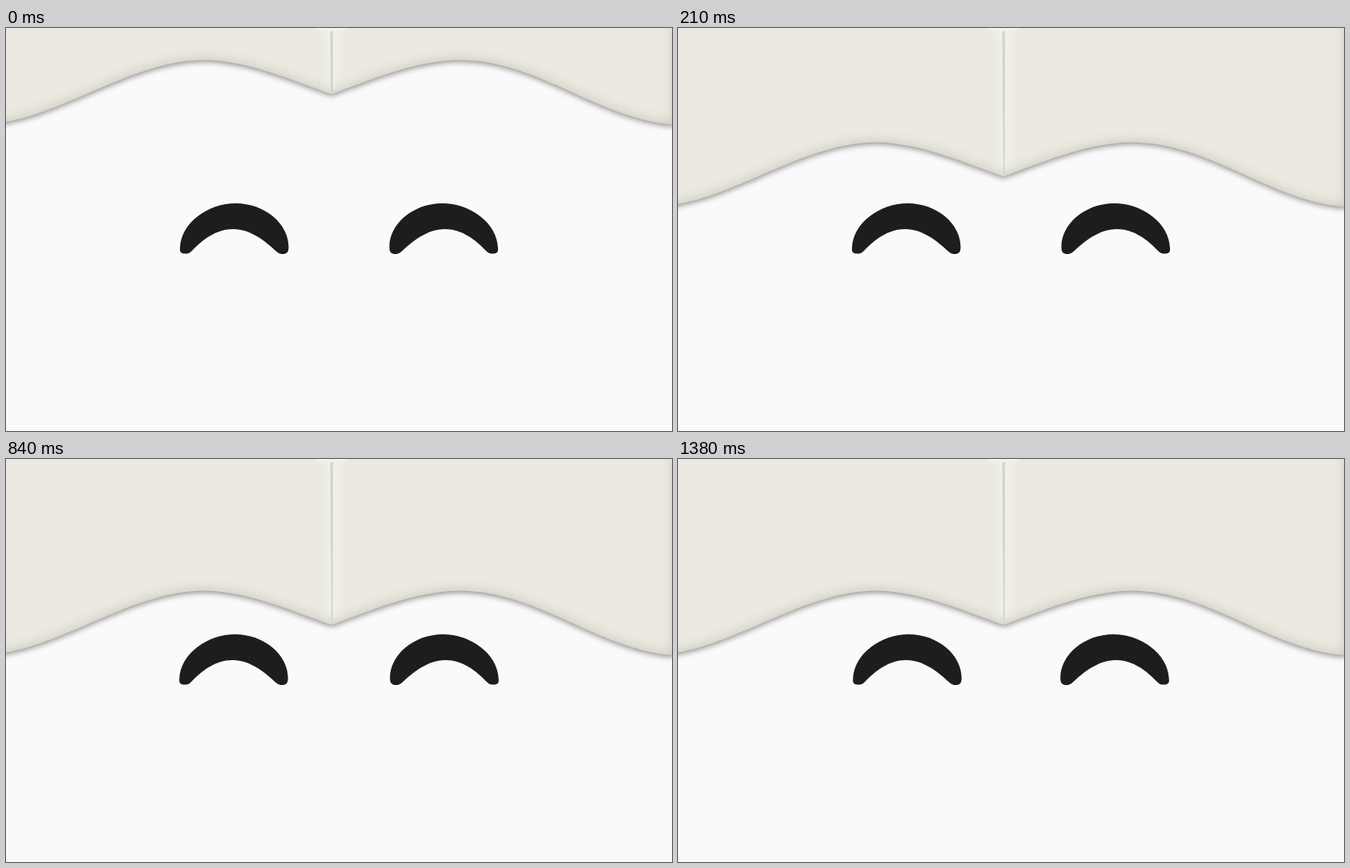
An HTML page with a canvas for the animation above (1410 ms loop, 800 px wide and 485 px high).

```html
<!DOCTYPE html>
<html lang="en">
<head>
<meta charset="utf-8">
<title>Smiling eyes</title>
<style>
  html, body { margin: 0; width: 100%; height: 100%; overflow: hidden; background: #fafafa; }
  canvas { display: block; width: 800px; height: 485px; }
</style>
</head>
<body>
<canvas id="stage" width="800" height="485"></canvas>
<script>
const ctx = document.getElementById('stage').getContext('2d');
const LOOP = 1410, STEP = 30;

// CSS-style cubic bezier easing
function bezier(x1, y1, x2, y2) {
  const at = (a, b, s) => 3 * (1 - s) ** 2 * s * a + 3 * (1 - s) * s * s * b + s ** 3;
  return x => {
    let lo = 0, hi = 1;
    for (let i = 0; i < 24; i++) {
      const mid = (lo + hi) / 2;
      if (at(x1, x2, mid) < x) lo = mid; else hi = mid;
    }
    return at(y1, y2, (lo + hi) / 2);
  };
}

const ease = bezier(0.25, 0.1, 0.25, 1);
const inOut = bezier(0.42, 0, 0.58, 1);
const quick = bezier(0.25, 0.1, 0.1, 1);

// each row: start, end, from, to, easing
const DROP = [[3, 398, 0, 120, ease]];
const SHIFT = [
  [240, 560, 0, 4.8, inOut],
  [560, 1200, 4.8, -2.1, quick],
  [1200, 1840, -2.1, 4.8, ease]
];

function track(rows, t) {
  let value = rows[0][2];
  for (const [start, end, from, to, fn] of rows) {
    if (t < start) break;
    value = from + (to - from) * fn(Math.min(1, (t - start) / (end - start)));
  }
  return value;
}

const eye = new Path2D(
  'M209 265C210 234 243 211 276 211C311 211 340 236 339.5 264' +
  'C339.5 270 337 272 332.5 272C330 272 328 271.5 325.5 269.5' +
  'C312 257 294 242 273 242C252 242 236 255 223 268.5' +
  'C220.5 271 219 271.5 215 271.5C211 271.5 208.5 270 209 265Z');

function fringe(drop) {
  const path = new Path2D();
  path.addPath(new Path2D(
    'M-30 119C-20 118 -10 116 0 113C78 99 155 39 238 38.5' +
    'C292 39 345 64 391 79.5C435 64 490 39 545 38.5' +
    'C640 39 710 109 800 116L803 116V-200H-30Z'), new DOMMatrix([1, 0, 0, 1, 0, drop]));
  return path;
}

function shadow(color, blur, y) {
  ctx.shadowColor = color;
  ctx.shadowBlur = blur;
  ctx.shadowOffsetY = y;
}

function drawFringe(drop) {
  const path = fringe(drop);
  ctx.save();
  shadow('rgba(0,0,0,0.45)', 7, 2);
  ctx.fillStyle = '#ebe9e1';
  ctx.fill(path);
  ctx.restore();

  ctx.save();
  ctx.clip(path);

  // pale glow along the seam
  const glow = ctx.createLinearGradient(376, 0, 408, 0);
  glow.addColorStop(0, 'rgba(240,243,233,0)');
  glow.addColorStop(0.5, 'rgba(240,243,233,0.8)');
  glow.addColorStop(1, 'rgba(240,243,233,0)');
  ctx.fillStyle = glow;
  ctx.fillRect(376, 0, 32, 220);

  // darker inner rim
  ctx.save();
  shadow('rgba(120,116,92,0.32)', 16, 0);
  const outside = new Path2D('M-60 -260H860V540H-60Z');
  outside.addPath(path);
  ctx.fillStyle = '#c9c7be';
  ctx.fill(outside, 'evenodd');
  ctx.restore();

  ctx.save();
  shadow('rgba(247,251,243,0.9)', 6, 0);
  ctx.fillStyle = '#f6f9f2';
  ctx.fillRect(372, -3, 38, 4);
  ctx.restore();

  const tip = 79.5 + drop;
  ctx.fillStyle = '#d1d2d1';
  ctx.beginPath();
  ctx.moveTo(389.5, 4);
  ctx.lineTo(392.7, 4);
  ctx.lineTo(392.4, tip);
  ctx.lineTo(391 - 0.8 * (1 - drop / 120), tip);
  ctx.fill();
  ctx.restore();
}

function drawEyes(shift) {
  ctx.fillStyle = '#1e1d1b';
  for (const side of [1, -1]) {
    ctx.save();
    ctx.translate(400, 0);
    ctx.scale(side, 1);
    ctx.translate(shift - 400, 0);
    ctx.fill(eye);
    ctx.restore();
  }
}

function render(t) {
  ctx.fillStyle = '#fafafa';
  ctx.fillRect(0, 0, 800, 485);
  drawFringe(track(DROP, t));
  drawEyes(track(SHIFT, t));
}

let start;
function tick(now) {
  if (start === undefined) start = now;
  render(Math.floor(((now - start) % LOOP) / STEP) * STEP);
  requestAnimationFrame(tick);
}
render(0);
requestAnimationFrame(tick);
</script>
</body>
</html>
```
